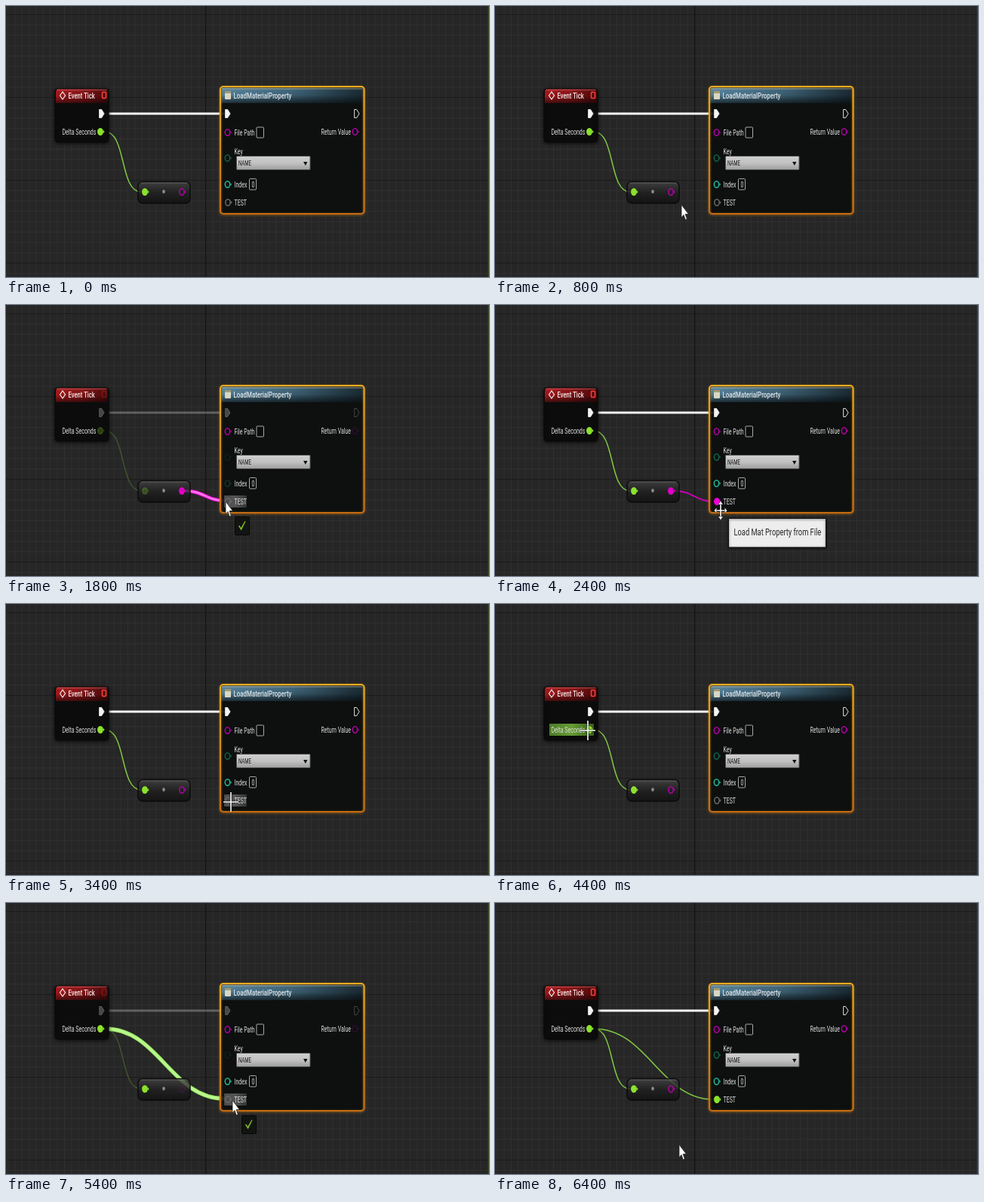
Animation of 640x360 px, one loop 6.6 s. Source, as an HTML page with a canvas:

```html
<!DOCTYPE html>
<html>
<head>
<meta charset="utf-8">
<style>
html, body { margin: 0; width: 100%; height: 100%; overflow: hidden; background: #262626; }
canvas { display: block; }
</style>
</head>
<body>
<canvas id="stage" width="640" height="360"></canvas>
<script>
const ctx = document.getElementById('stage').getContext('2d');
const LOOP = 6600, STEP = 200;
const SQUEEZE = 0.68; // the whole editor view is narrowed by this factor
const GREEN = '#8be22e', MAGENTA = '#e000c8', PURPLE = '#b300a6', TEAL = '#22b896', LABEL = '#dedede';
const PIN = { delta: [125, 167], floatIn: [184, 247], textOut: [233, 247], test: [294, 261] };

// [start ms, cursor shape, x, y]
const CURSOR = [
  [400, 'arrow', 244, 322], [600, 'arrow', 246, 292], [800, 'arrow', 247, 264], [1000, 'cross', 247, 250],
  [1400, 'arrow', 250, 251], [1600, 'arrow', 268, 256], [1800, 'arrow', 291, 261], [2000, 'cross', 294, 262],
  [2200, 'move', 299, 273], [2800, 'cross', 300, 263], [3000, 'cross', 295, 263], [3400, 'cross', 298, 263],
  [3600, 'arrow', 268, 250], [3800, 'arrow', 218, 224], [4000, 'arrow', 168, 196], [4200, 'arrow', 133, 176],
  [4400, 'cross', 123, 168], [4600, 'arrow', 142, 177], [4800, 'arrow', 188, 203], [5000, 'arrow', 238, 230],
  [5200, 'arrow', 282, 253], [5400, 'arrow', 300, 262], [5600, 'cross', 298, 262], [6000, 'arrow', 285, 280],
  [6200, 'arrow', 261, 304], [6400, 'arrow', 244, 321]
];

function text(str, x, y, size = 10.3, color = LABEL, weight = 400) {
  ctx.save();
  ctx.translate(x + 0.5, y);
  ctx.scale(SQUEEZE, 1);
  ctx.font = `${weight} ${size}px Roboto, sans-serif`;
  ctx.fillStyle = color;
  ctx.fillText(str, 0, 0);
  ctx.restore();
}

function box(x, y, w, h, r, fill, stroke, line = 1) {
  ctx.beginPath();
  ctx.roundRect(x, y, w, h, r);
  if (fill) { ctx.fillStyle = fill; ctx.fill(); }
  if (stroke) { ctx.strokeStyle = stroke; ctx.lineWidth = line; ctx.stroke(); }
}

function poly(points, fill, stroke, line = 1) {
  ctx.beginPath();
  points.forEach(([x, y]) => ctx.lineTo(x, y));
  ctx.closePath();
  if (fill) { ctx.fillStyle = fill; ctx.fill(); }
  if (stroke) { ctx.strokeStyle = stroke; ctx.lineWidth = line; ctx.stroke(); }
}

function gradient(x0, y0, x1, y1, ...colors) {
  const g = ctx.createLinearGradient(x0, y0, x1, y1);
  colors.forEach((c, i) => g.addColorStop(i / (colors.length - 1), c));
  return g;
}

function faded(alpha, draw) {
  ctx.save();
  ctx.globalAlpha *= alpha;
  draw();
  ctx.restore();
}

function shadowed(blur, draw, color = 'rgba(0,0,0,.75)') {
  ctx.save();
  ctx.shadowColor = color;
  ctx.shadowBlur = blur;
  ctx.shadowOffsetY = 1;
  draw();
  ctx.restore();
}

function pin([x, y], color, filled, bright = true) {
  faded(bright ? 1 : 0.22, () => {
    ctx.beginPath();
    ctx.ellipse(x, y, 3.2, 4.2, 0, 0, 7);
    ctx.strokeStyle = ctx.fillStyle = color;
    ctx.lineWidth = 1.5;
    if (filled) ctx.fill();
    ctx.stroke();
    poly([[x + 4, y - 2], [x + 5.6, y], [x + 4, y + 2]], color);
  });
}

function execPin(x, y, filled, bright) {
  const shape = [[x - 3, y - 5.5], [x, y - 5.5], [x + 3.5, y], [x, y + 5.5], [x - 3, y + 5.5]];
  faded(bright ? 1 : 0.25, () => poly(shape, filled && '#f4f4f4', '#dedede'));
}

function wire([x0, y0], [x1, y1], color, width, bend = 0.45) {
  const d = Math.abs(x1 - x0) * bend;
  ctx.beginPath();
  ctx.moveTo(x0, y0);
  ctx.bezierCurveTo(x0 + d, y0, x1 - d, y1, x1, y1);
  ctx.strokeStyle = color;
  ctx.lineWidth = width;
  ctx.stroke();
}

function grid() {
  ctx.fillStyle = '#262626';
  ctx.fillRect(0, 0, 640, 360);
  const cellY = 13.75, cellX = cellY * SQUEEZE;
  ctx.fillStyle = '#303030';
  for (let x = 264.5 % cellX; x < 640; x += cellX) ctx.fillRect(x - 0.5, 0, 1, 360);
  for (let y = 121.5 % cellY; y < 360; y += cellY) ctx.fillRect(0, y - 0.5, 640, 1);
  ctx.fillStyle = '#1b1b1b';
  for (let y = 11; y < 360; y += 110) ctx.fillRect(0, y, 640, 1);
  ctx.fillStyle = '#141414';
  ctx.fillRect(264, 0, 1.3, 360);
  ctx.fillStyle = '#39461f';
  ctx.fillRect(639, 0, 1, 360);
}

function wires(s) {
  faded(s.drag ? 0.28 : 1, () => {
    wire([130, 143], [290, 143], '#f6f6f6', 3);
    wire([131, 167], [179, 247], '#80c844', 1.5, 0.6);
    if (s.link === 'text') wire([238, 247], [290, 261], '#d000ba', 1.8);
    if (s.link === 'float') wire([131, 167], [290, 261], '#80c844', 1.6);
  });
  const end = s.onTarget ? [290, 260] : [s.x, s.y];
  if (s.drag === 'text') {
    wire([238, 247], end, MAGENTA, 5);
    wire([238, 247], end, '#ff70ee', 3);
  }
  if (s.drag === 'float') {
    wire([131, 167], end, '#8edb58', 5.4);
    wire([131, 167], end, '#b9f78c', 3.6);
  }
}

function eventNode(s) {
  shadowed(5, () => box(65, 110, 71, 71, 4, 'rgba(13,13,13,.92)', '#090909'));
  box(66, 110.5, 69, 18, [4, 4, 0, 0], gradient(66, 0, 135, 0, '#a81a1e', '#8b1518', '#4c0a0c'));
  box(66, 110.5, 69, 18, [4, 4, 0, 0], gradient(0, 110, 0, 129, 'rgba(0,0,0,0)', 'rgba(0,0,0,.08)', 'rgba(8,4,4,.6)'));
  box(67, 110.5, 67, 2, 1, 'rgba(255,140,140,.3)');
  poly([[71.5, 119], [75, 114], [78.5, 119], [75, 124]], null, '#eee', 1.2);
  text('Event Tick', 82, 123, 11.2, '#f0e9e9', 500);
  faded(s.drag ? 0.25 : 1, () => box(127.5, 114.5, 5, 8, 1, null, '#ff4238', 1.5));
  execPin(126.6, 143, true, !s.drag);
  if (s.hover === 'delta') box(72, 159, 59, 16, 1, gradient(72, 0, 131, 0, '#4d7b25', '#659c35', '#365d1b'));
  text('Delta Seconds', 74, 171);
  pin(PIN.delta, GREEN, true, s.drag !== 'text');
}

function convertNode(s) {
  const body = gradient(0, 233, 0, 262, 'rgba(70,70,70,.8)', 'rgba(32,32,32,.8)', 'rgba(16,16,16,.85)');
  box(175, 233.5, 69, 28.5, 6, body, '#0b0b0b', 1.4);
  box(178, 234.5, 63, 1, 1, 'rgba(190,190,190,.3)');
  if (s.hover === 'textOut') box(226, 241, 12.5, 12.5, 0, '#a00098');
  pin(PIN.floatIn, GREEN, true, s.drag !== 'text');
  ctx.beginPath();
  ctx.ellipse(209, 246.5, 1.8, 2.6, 0, 0, 7);
  ctx.fillStyle = '#8c8c8c';
  ctx.fill();
  const linked = s.link === 'text' || s.drag === 'text';
  pin(PIN.textOut, linked ? MAGENTA : s.hover === 'textOut' ? '#ff30ea' : PURPLE, linked, s.drag !== 'float');
}

function functionNode(s) {
  const border = gradient(0, 106, 0, 277, '#e8ac20', '#d08a18', '#c66c10');
  box(284, 107, 190.5, 169, 4, 'rgba(11,14,13,.9)');
  box(285.5, 108.5, 187.5, 20.5, [3, 3, 0, 0], gradient(285, 0, 473, 0, '#5b8ba6', '#42697e', '#1b2c35'));
  box(285.5, 108.5, 187.5, 20.5, [3, 3, 0, 0], gradient(0, 108, 0, 129, 'rgba(0,0,0,0)', 'rgba(0,0,0,.12)', 'rgba(6,10,12,.72)'));
  box(286, 109, 186, 2, 1, 'rgba(170,210,230,.25)');
  shadowed(3, () => box(284, 107, 190.5, 169, 4, null, border, 2.2), 'rgba(215,130,20,.6)');

  box(290, 113, 8, 11, 1, '#d9d7c2');
  ctx.fillStyle = '#a39a72';
  ctx.fillRect(290, 113, 8, 3);
  text('LoadMaterialProperty', 301, 123, 11.6, '#dfe6ea', 500);
  execPin(293.6, 143, true, !s.drag);
  execPin(464.6, 143, false, !s.drag);

  pin([293.5, 168], PURPLE, false);
  text('File Path', 302, 172);
  box(332, 161, 9.5, 14, 1, '#0b0d0d', '#a9a9a9');
  text('Return Value', 417, 171);
  pin([462.5, 167], PURPLE, false, !s.drag);

  text('Key', 302, 196.5);
  pin([293.5, 202], '#14614c', false, !s.drag);
  box(305.5, 199.5, 97.5, 18, 1, gradient(0, 199, 0, 218, '#d0d0d0', '#c2c2c2', '#9c9c9c'), '#555');
  text('NAME', 307.5, 212, 8.9, '#151515');
  poly([[394, 207], [399.5, 207], [396.8, 212]], '#111');

  pin([293.5, 237], TEAL, false, s.drag !== 'text');
  text('Index', 302, 240.5);
  box(322.5, 229.5, 9, 14.5, 1, '#0b0d0d', '#a9a9a9');
  text('0', 325, 240.5);

  if (s.hover === 'test') box(289, 253, 30, 16, 1, gradient(289, 0, 319, 0, '#4a4a4a', '#555', '#333'));
  const color = { text: '#f000d4', float: GREEN }[s.link];
  pin(PIN.test, color || '#6a6a6a', !!color);
  text('TEST', 302, 265);
}

function tooltip(x, y, w, h, lines, size = 12.8) {
  shadowed(3, () => box(x, y, w, h, 0, '#ededed', '#111'));
  lines.forEach((line, i) => text(line, x + 6.5, y + 23 + i * 15 - (h < 60 ? 1 : 0), size, '#262626'));
}

function bubble() {
  box(290, 95.5, 14, 8, 2, '#8d8d8d');
  poly([[293, 103], [297, 103], [293, 106]], '#8d8d8d');
  ctx.fillStyle = '#333';
  for (let i = 0; i < 3; i++) ctx.fillRect(293 + i * 3.2, 99, 1.5, 2);
}

function overlays(s) {
  const t = s.t;
  if (t >= 1200 && t < 1400) tooltip(243.5, 258.5, 138.5, 81, ['Return Value', 'String', '', 'Converts a float value to a string']);
  if (t >= 2400 && t < 2800) tooltip(309.5, 283.5, 129, 38.5, ['Load Mat Property from File'], 13.7);
  if (t >= 2600 && t < 3400) bubble();
  const testTip = (t >= 2800 && t < 3400) || (t >= 5800 && t < 6000);
  if (testTip) tooltip(s.x - 4, s.y + 9, 171, 52, ['TEST', 'Accepts any type of value to display']);
  if (s.onTarget) {
    const x = s.x + 12, y = s.y + 20;
    box(x + 0.5, y + 0.5, 19, 24, 1, '#121412', '#070707');
    poly([[x + 5, y + 12.5], [x + 6.3, y + 11.7], [x + 8.4, y + 15], [x + 13.5, y + 6], [x + 14.5, y + 6.5], [x + 8.7, y + 18.5]], '#86bd2c');
  }
}

function cursor({ shape, x, y }) {
  if (shape === 'arrow') {
    const tip = [[0, 0], [0, 17], [3, 13.5], [5.3, 20], [7.3, 18.7], [5.2, 12.6], [9.5, 12.6]];
    poly(tip.map(([dx, dy]) => [x + dx, y + dy]), '#fff', '#222', 0.8);
    return;
  }
  const move = shape === 'move', w = move ? 8 : 10, h = move ? 12 : 13;
  const strokes = [['rgba(0,0,0,.65)', 3.2], ['#fff', 1.6]];
  for (const [color, width] of strokes) {
    ctx.beginPath();
    ctx.moveTo(x - w, y); ctx.lineTo(x + w, y);
    ctx.moveTo(x, y - h); ctx.lineTo(x, y + h);
    ctx.strokeStyle = color;
    ctx.lineWidth = width;
    ctx.stroke();
  }
  if (!move) return;
  for (const d of [-1, 1]) {
    poly([[x, y + d * 12.5], [x - 3.2, y + d * 8], [x + 3.2, y + d * 8]], '#fff', '#222', 0.5);
    poly([[x + d * 8.5, y], [x + d * 5.3, y - 4], [x + d * 5.3, y + 4]], '#fff', '#222', 0.5);
  }
}

function stateAt(time) {
  const t = Math.floor(time / STEP) * STEP;
  const within = (a, b) => t >= a && t < b;
  const [, shape, x, y] = CURSOR.filter(c => c[0] <= t).pop() || [];
  const onTarget = within(1800, 2000) || within(5400, 5600);
  return {
    t, shape, x, y, onTarget,
    drag: within(1400, 2000) ? 'text' : within(4600, 5600) ? 'float' : null,
    link: within(2000, 3400) ? 'text' : t >= 5600 ? 'float' : null,
    hover: within(1000, 1400) ? 'textOut'
      : within(4400, 4600) ? 'delta'
      : onTarget || within(2000, 2200) || within(2800, 3600) || within(5600, 6000) ? 'test' : null
  };
}

function frame() {
  const s = stateAt(performance.now() % LOOP);
  grid();
  wires(s);
  eventNode(s);
  convertNode(s);
  functionNode(s);
  overlays(s);
  if (s.shape) cursor(s);
  requestAnimationFrame(frame);
}
frame();
</script>
</body>
</html>
```
